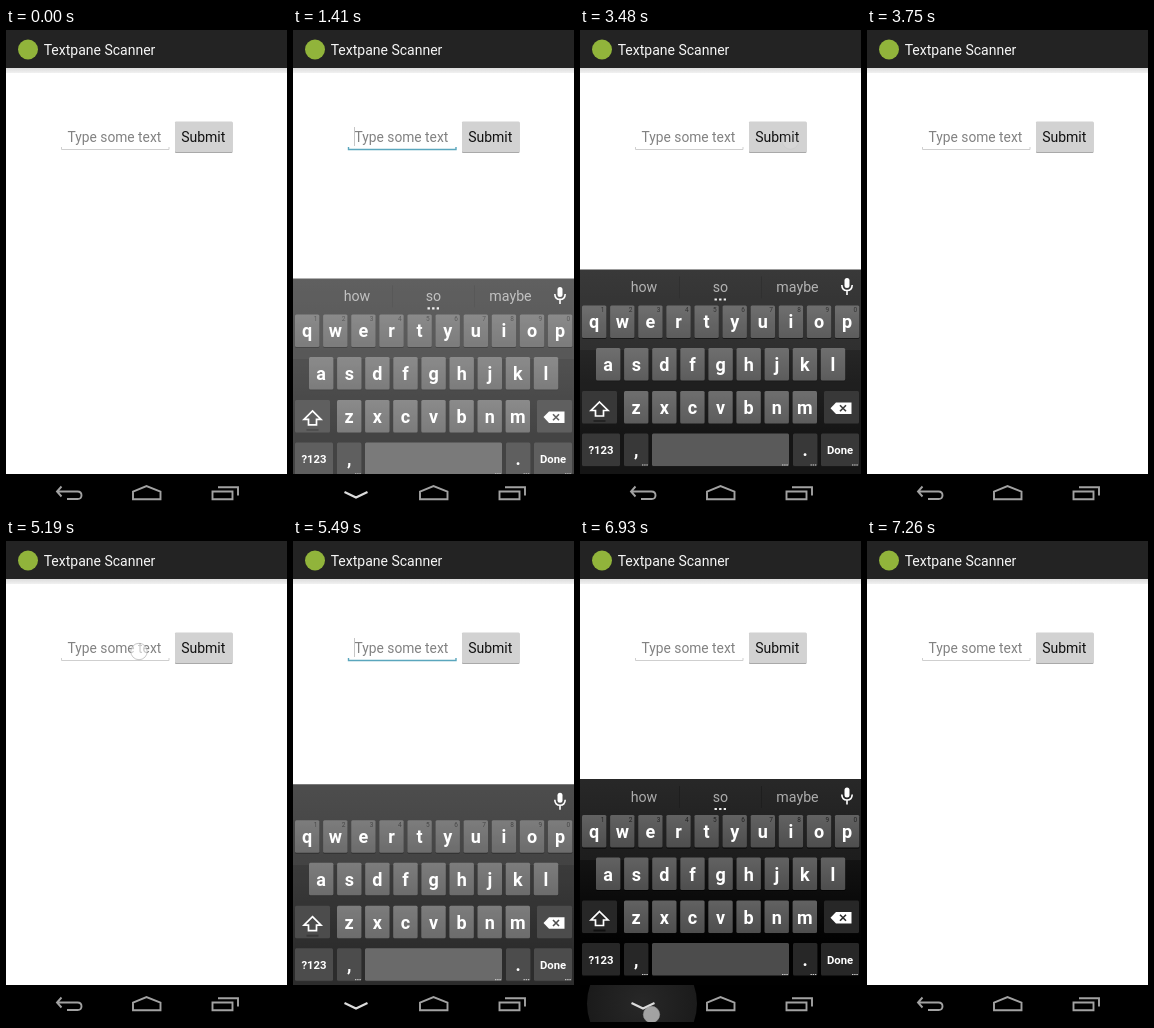
Write an HTML page that moves like this. It is 281 px wide and 483 px high and loops after 7.32 s.

```html
<!DOCTYPE html>
<html lang="en">
<head>
<meta charset="utf-8">
<title>Keyboard opening and closing</title>
<style>
  html, body { margin: 0; width: 100%; height: 100%; overflow: hidden; background: #fff; }
  svg { display: block; width: 100%; height: 100%; font-family: Roboto, sans-serif; font-size: 14px; }
  .icon { fill: none; stroke: #a2a2a2; stroke-width: 1.9; }
  .key { font-weight: 700; font-size: 18px; fill: #fff; text-anchor: middle; }
  .key.small { font-size: 11.3px; }
  .hint { font-size: 6.5px; fill: #222; text-anchor: middle; }
  .word { font-size: 14.2px; fill: #acacac; text-anchor: middle; }
</style>
</head>
<body>
<svg viewBox="0 0 281 483">
  <defs>
    <linearGradient id="shade" x2="0" y2="1">
      <stop stop-color="#dcdcdc"/><stop offset="1" stop-color="#f1f1f1"/>
    </linearGradient>
    <linearGradient id="board" x2="0" y2="1">
      <stop stop-color="#282828"/><stop offset=".39" stop-color="#1d1d1d"/>
      <stop offset=".39" stop-color="#131313"/><stop offset=".8" stop-color="#010101"/>
    </linearGradient>
    <linearGradient id="cap" x2="0" y2="1">
      <stop stop-color="#626262"/><stop offset="1" stop-color="#4e4e4e"/>
    </linearGradient>
    <radialGradient id="glowFill">
      <stop stop-color="#282828"/><stop offset="1" stop-color="#1b1b1b"/>
    </radialGradient>
    <clipPath id="navClip"><path d="M0 446H281V483H0Z"/></clipPath>
  </defs>

  <path d="M0 0H281V483H0Z" fill="#fff"/>
  <path d="M0 0H281V40H0Z" fill="#000"/>
  <path d="M0 2H281V40H0Z" fill="#232323"/>
  <path d="M0 40H281V45H0Z" fill="url(#shade)"/>
  <circle cx="22" cy="21.5" r="10" fill="#91b43b"/>
  <text x="37.7" y="26.7" fill="#f6f6f6">Textpane Scanner</text>

  <text x="61.5" y="114" fill="#828282" font-size="13.8">Type some text</text>
  <path id="underline" d="M55.5 119V121.5H163V119" fill="none"/>
  <path id="cursor" d="M61.5 99V118" stroke="#c6c6c6"/>
  <rect x="169" y="94" width="57.5" height="31" rx="1" fill="#a9a9a9"/>
  <rect x="169" y="93.5" width="57.5" height="30.5" rx="1" fill="#d2d2d2"/>
  <text x="175.2" y="114" fill="#111">Submit</text>

  <g id="keyboard"></g>

  <path d="M0 446H281V483H0Z" fill="#000"/>
  <g clip-path="url(#navClip)">
    <circle id="glow" cx="62" cy="464.5" r="55" fill="url(#glowFill)"/>
  </g>
  <path id="back" class="icon" d="M55.5 458.5L51 463.5L55.5 468.5M51 463.5H71.5Q75.5 463.5 75.5 467.3T71.5 471H61"/>
  <path id="down" class="icon" d="M51.5 464L63 469.5L74.5 464" style="stroke:#dcdcdc;stroke-width:2.2"/>
  <path class="icon" d="M127 471.3V463.7L140.5 458L154.5 463.7V471.3Z"/>
  <path class="icon" d="M206.5 463.5H226.5V471.3H206.5ZM212 459.2H232V467.5"/>
  <circle id="touch" r="8.2" fill="#fff" fill-opacity=".58" stroke="#999" stroke-opacity=".55"/>
</svg>
<script>
const LOOP = 7320, SLIDE = 300, DROP = 97, BLINK = 470;
const PITCH = 28.1, CAP = 24.4;
const ROW_TOPS = [276, 318.5, 361.5, 404];

// Times in ms at which each part of the two openings changes.
const sessions = [
  { focus: 1350, blink: 1410, open: 1303, words: 1380, down: 1360, blur: 3390, close: 3351, up: 3400 },
  { focus: 5310, blink: 5320, open: 5358, words: 5640, down: 5400, blur: 6900, close: 6950, up: 6980 }
];
const touches = [
  { x: 133, y: 112.5, press: 870, release: 1110, fade: 180 },
  { x: 210.5, y: 113, press: 3270, release: 3330, fade: 180 },
  { x: 133, y: 112.5, press: 5190, release: 5310, fade: 150 },
  { x: 71.5, y: 475.5, press: 6690, release: 6930, fade: 180 }
];

const el = id => document.getElementById(id);
const clamp = v => Math.max(0, Math.min(1, v));
const text = (x, y, cls, label) => `<text x="${x}" y="${y}" class="${cls}">${label}</text>`;
const cap = (x, y, w, fill) =>
  `<rect x="${x}" y="${y + 1}" width="${w}" height="32.5" rx="1.5" fill="#050505"/>` +
  `<rect x="${x}" y="${y}" width="${w}" height="32.5" rx="1.5" fill="${fill}"/>`;

function letterRow(letters, left, y) {
  return [...letters].map((letter, i) => {
    const x = left + i * PITCH;
    return cap(x, y, CAP, 'url(#cap)') + text(x + CAP / 2, y + 23, 'key', letter);
  }).join('');
}

function buildKeyboard() {
  const [top, home, lower, bottom] = ROW_TOPS;
  const dark = '#272727';
  const numbers = [...'1234567890'].map((n, i) => text(22.5 + i * PITCH, top + 7, 'hint', n)).join('');
  const dots = [65, 205, 233.5, 275].map(x =>
    `<path d="M${x - 3} ${bottom + 31.5}h6" stroke="#ccc" stroke-dasharray="1.4 .8"/>`).join('');

  const strip = `<g id="words">
    <path d="M99.5 247V269M181.5 247V269" stroke="#1e1e1e"/>
    ${text(64, 262.8, 'word', 'how')}${text(140.5, 262.8, 'word', 'so')}${text(217.5, 262.8, 'word', 'maybe')}
    <path d="M134.5 270H146" stroke="#eee" stroke-width="2.2" stroke-dasharray="2.4 2.2"/></g>`;
  const mic = `<rect x="264.5" y="248.5" width="5" height="10" rx="2.5" fill="#fff"/>
    <path d="M261.8 255.5Q262 261 267 261T272.2 255.5M267 261V265.5" fill="none" stroke="#fff" stroke-width="1.6"/>`;
  const shift = `<path d="M19.5 372.5L28 381H23.5V386.5H15.5V381H11Z" fill="none" stroke="#fff" stroke-width="1.7"/>
    <path d="M13.5 391.5H25.5" stroke="#111" stroke-width="2"/>`;
  const erase = `<path d="M250.5 378.7L256 373H271.5V384.5H256Z" fill="#fff"/>
    <path d="M260 375.8L266 381.8M266 375.8L260 381.8" stroke="#2b2b2b" stroke-width="1.6"/>`;

  el('keyboard').innerHTML =
    '<path d="M0 240H281V447H0Z" fill="url(#board)"/>' + strip + mic +
    letterRow('qwertyuiop', 2, top) + numbers +
    letterRow('asdfghjkl', 16, home) +
    cap(2, lower, 35, dark) + shift +
    letterRow('zxcvbnm', 44, lower) +
    cap(244, lower, 35, dark) + erase +
    cap(2, bottom, 38, dark) + text(21, bottom + 21, 'key small', '?123') +
    cap(44, bottom, CAP, dark) + text(56.2, bottom + 22.5, 'key', ',') +
    cap(72, bottom, 137, '#4c4c4c') +
    cap(213, bottom, CAP, dark) + text(225.2, bottom + 22.5, 'key', '.') +
    cap(241, bottom, 38, dark) + text(260, bottom + 21, 'key small', 'Done') + dots;
}

const set = (id, attributes) => {
  for (const name in attributes) el(id).setAttribute(name, attributes[name]);
};
const show = (id, visible) => set(id, { opacity: +visible });

function render(t) {
  const s = sessions[t < 4500 ? 0 : 1];
  const away = t < s.close ? clamp(1 - (t - s.open) / SLIDE) : clamp((t - s.close) / SLIDE);
  set('keyboard', { opacity: 1 - away ** 3, transform: `translate(0 ${DROP * away ** 5})` });
  show('words', t >= s.words);

  const focused = t >= s.focus && t < s.blur;
  set('underline', { stroke: focused ? '#5aa6bd' : '#cfcfcf', 'stroke-width': focused ? 1.4 : 1 });
  show('cursor', focused && Math.floor(Math.max(0, t - s.blink) / BLINK) % 2 === 0);

  const down = t >= s.down && t < s.up;
  show('down', down);
  show('back', !down);

  const touch = touches.find(p => t >= p.press && t < p.release + p.fade);
  show('touch', false);
  if (touch) {
    set('touch', { cx: touch.x, cy: touch.y, opacity: 1 - clamp((t - touch.release) / touch.fade) });
  }

  set('glow', { opacity: clamp((t - 6660) / 90) * (1 - clamp((t - 6930) / 300)) });
}

buildKeyboard();
const start = performance.now();
function tick() {
  render((performance.now() - start) % LOOP);
  requestAnimationFrame(tick);
}
tick();
</script>
</body>
</html>
```
